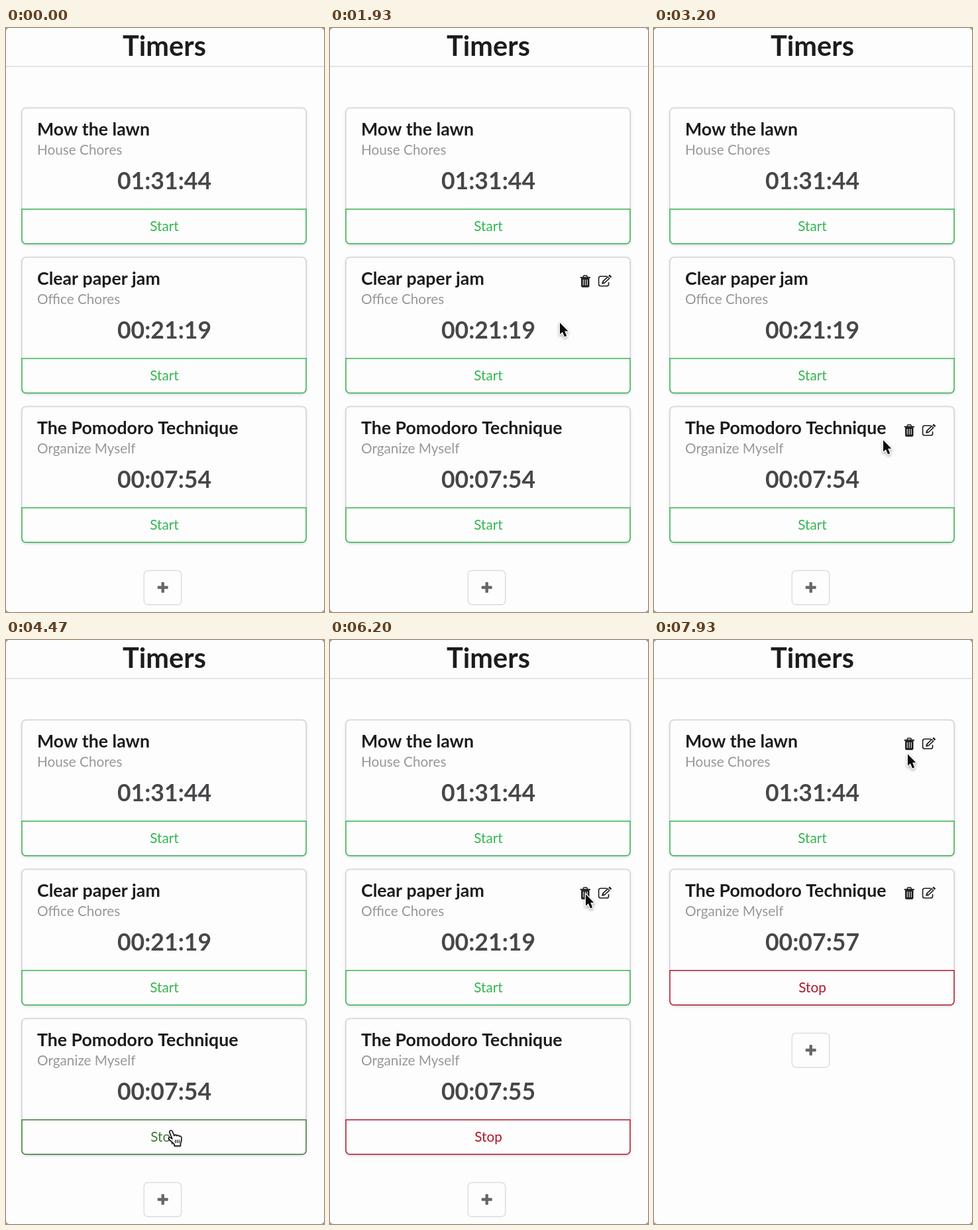
Animation, 480 px wide and 880 px high, one loop 8 s. Source, as an HTML page with a canvas:

```html
<!DOCTYPE html>
<html lang="en">
<head>
<meta charset="utf-8">
<title>Timers</title>
<style>
  html, body { margin: 0; width: 100%; height: 100%; overflow: hidden; background: #fefdfe; }
  canvas { display: block; width: 480px; height: 880px; }
</style>
</head>
<body>
<canvas id="stage"></canvas>
<script>
const W = 480, H = 880, LOOP = 8000;
const CLICK = 4440, REMOVED = 7300, TICK = 5400;
const LEFT = 24, WIDTH = 429, FIRST = 120.5, PITCH = 225, CONTENT = 152.5, HEIGHT = 204.5;
const GREEN = [53, 181, 80], GREEN_HOVER = [32, 152, 62], RED = [172, 24, 42];

const canvas = document.getElementById('stage');
const dpr = window.devicePixelRatio || 1;
canvas.width = W * dpr;
canvas.height = H * dpr;
const ctx = canvas.getContext('2d');

// Pointer stops: time, x, y
const path = [
  [300, 350, 172], [450, 350, 215], [900, 349, 640], [1200, 349, 798],
  [1400, 349, 798], [1900, 347, 444], [1980, 347, 444], [2300, 345, 43],
  [2420, 345, 43], [2620, 345, 180], [3150, 346, 621], [3400, 346, 621],
  [3950, 249, 740], [5150, 249, 740], [5570, 378, 672], [5640, 378, 672],
  [6040, 386, 383], [7460, 386, 383], [7860, 383, 172], [8000, 383, 172]
];

const rgb = c => `rgb(${c.map(Math.round).join(',')})`;
const mix = (a, b, p) => a.map((v, i) => v + (b[i] - v) * p);
const clamp = v => Math.max(0, Math.min(1, v));
const ease = p => p * p * (3 - 2 * p);

function pointerAt(t) {
  if (t < path[0][0]) return null;
  const i = path.findIndex(k => k[0] > t);
  const [t0, x0, y0] = path[i - 1], [t1, x1, y1] = path[i];
  const p = ease((t - t0) / (t1 - t0));
  return { x: x0 + (x1 - x0) * p, y: y0 + (y1 - y0) * p };
}

function text(str, x, y, size, color, weight = 400, align = 'left') {
  ctx.font = `${weight} ${size}px Lato, sans-serif`;
  ctx.textAlign = align;
  ctx.fillStyle = color;
  ctx.fillText(str, x, y);
}

function box(x, y, w, h, radii, stroke, fill) {
  ctx.beginPath();
  ctx.roundRect(x, y, w, h, radii);
  if (fill) { ctx.fillStyle = fill; ctx.fill(); }
  if (stroke) { ctx.strokeStyle = stroke; ctx.lineWidth = 1.5; ctx.stroke(); }
}

function shadow(color, blur, dy) {
  ctx.shadowColor = color;
  ctx.shadowBlur = blur * dpr;
  ctx.shadowOffsetY = dy * dpr;
}

function line(points, width, color) {
  ctx.beginPath();
  points.forEach(([x, y]) => ctx.lineTo(x, y));
  ctx.lineWidth = width;
  ctx.strokeStyle = color;
  ctx.stroke();
}

function at(x, y, draw) {
  ctx.save();
  ctx.translate(x, y);
  draw();
  ctx.restore();
}

function trash() {
  const ink = '#1c1c1e';
  line([[-3.3, -6.3], [-2.2, -8.5], [2.2, -8.5], [3.3, -6.3]], 1.5, ink);
  box(-7.8, -6.6, 15.6, 1.9, 0.6, null, ink);
  box(-6.2, -5, 12.4, 14.2, [0, 0, 2, 2], null, ink);
  for (const x of [-3, 0, 3]) line([[x, -2.6], [x, 6.2]], 1.2, '#e6e6e8');
}

function edit() {
  const ink = '#1c1c1e';
  ctx.beginPath();
  ctx.moveTo(3.2, -6.8);
  ctx.lineTo(-6.3, -6.8);
  ctx.arcTo(-9.2, -6.8, -9.2, -4, 2.9);
  ctx.lineTo(-9.2, 4.8);
  ctx.arcTo(-9.2, 7.8, -6.3, 7.8, 2.9);
  ctx.lineTo(2.8, 7.8);
  ctx.arcTo(5.8, 7.8, 5.8, 4.8, 2.9);
  ctx.lineTo(5.8, 2);
  ctx.lineWidth = 1.6;
  ctx.strokeStyle = ink;
  ctx.stroke();
  line([[-2, 2.3], [6.2, -5.4]], 5, ink);
  line([[-1.4, 1.8], [5.4, -4.6]], 1.8, '#fefdfe');
  line([[7.1, -6.2], [8.9, -7.9]], 4.6, ink);
  ctx.beginPath();
  ctx.moveTo(-4.6, 4.8);
  ctx.lineTo(-3.9, 0.4);
  ctx.lineTo(-0.2, 4.2);
  ctx.fillStyle = ink;
  ctx.fill();
}

function arrow() {
  const shape = new Path2D('M0 0V17.6L4 13.9L7 21.2L10.2 19.9L7.2 12.8H12.4Z');
  ctx.lineJoin = 'round';
  shadow('rgba(0,0,0,.35)', 4, 2);
  ctx.lineWidth = 2.6;
  ctx.strokeStyle = '#fff';
  ctx.stroke(shape);
  shadow('transparent', 0, 0);
  ctx.fillStyle = '#0c0c0e';
  ctx.fill(shape);
}

function hand() {
  const shape = new Path2D(
    'M-2.2 1.6C-2.4-1.2 1-2 2.2.6L5 7.2C5.4 5.2 8 5 8.8 7.2' +
    'C9.6 5.6 12 6 12.4 8C13.4 6.8 15.6 7.6 15.8 10C16.2 14 15.6 16 14.4 18.4V22.4H5.2V20' +
    'C2.6 17.6-.2 14.6-3 12.4C-4.6 10.8-2.6 8.6-.4 10L2 12Z');
  ctx.lineJoin = 'round';
  shadow('rgba(0,0,0,.3)', 3, 1.5);
  ctx.fillStyle = '#fff';
  ctx.fill(shape);
  shadow('transparent', 0, 0);
  ctx.lineWidth = 1.6;
  ctx.strokeStyle = '#111';
  ctx.stroke(shape);
  for (const x of [6.6, 9.4, 12.2]) line([[x, 13], [x, 18]], 1.2, '#111');
}

function inside(p, top, bottom) {
  return p && p.x > LEFT && p.x < LEFT + WIDTH && p.y > top && p.y < bottom;
}

function card(timer, top, pointer) {
  const overButton = inside(pointer, top + CONTENT, top + HEIGHT);
  const base = overButton ? GREEN_HOVER : GREEN;
  const color = rgb(mix(base, RED, timer.running));
  const split = top + CONTENT;

  shadow('rgba(190,190,198,.8)', 4, 1.6);
  box(LEFT, top, WIDTH, HEIGHT, 6, null, '#fefdfe');
  shadow('transparent', 0, 0);
  box(LEFT, top, WIDTH, HEIGHT, 6, '#d4d3d8');
  box(LEFT, split, WIDTH, HEIGHT - CONTENT, [0, 0, 6, 6], color, '#fefdfe');

  text(timer.title, 47, top + 41, 26.7, '#1c1c1e', 700);
  text(timer.project, 47, top + 70.5, 20.76, '#979799');
  text(timer.time, 239, top + 122.5, 35.6, '#474749', 700, 'center');
  text(timer.running > 0 ? 'Stop' : 'Start', 239, top + 185.5, 20.76, color, 400, 'center');

  if (timer.pinned || inside(pointer, top, split)) {
    at(385.3, top + 36, trash);
    at(414.8, top + 35.5, edit);
  }
  return overButton;
}

function addButton(y) {
  box(208.3, y, 56.4, 51.5, 6, '#dddce0', '#fefdfe');
  ctx.fillStyle = '#676769';
  ctx.beginPath();
  ctx.roundRect(228.7, y + 23.3, 16, 4.4, 1);
  ctx.roundRect(234.5, y + 17.5, 4.4, 16, 1);
  ctx.fill();
}

function draw(t) {
  ctx.setTransform(dpr, 0, 0, dpr, 0, 0);
  ctx.fillStyle = '#96959b';
  ctx.fillRect(0, 0, W, H);
  box(0, 0, W, H, 5, null, '#fefdfe');

  text('Timers', 239, 42, 41.5, '#1c1c1e', 700, 'center');
  ctx.fillStyle = '#dddce1';
  ctx.fillRect(0, 57.2, W, 1.5);

  const seconds = 54 + (t < TICK ? 0 : 1 + Math.floor((t - TICK) / 1000));
  const removed = t >= REMOVED;
  const timers = [
    { title: 'Mow the lawn', project: 'House Chores', time: '01:31:44', running: 0 },
    { title: 'Clear paper jam', project: 'Office Chores', time: '00:21:19', running: 0 },
    { title: 'The Pomodoro Technique', project: 'Organize Myself', time: '00:07:' + seconds,
      running: clamp((t - CLICK) / 130), pinned: removed }
  ];
  if (removed) timers.splice(1, 1);

  const pointer = pointerAt(t);
  let overButton = false;
  timers.forEach((timer, i) => {
    if (card(timer, FIRST + i * PITCH, pointer)) overButton = true;
  });
  addButton(142.5 + timers.length * PITCH);

  if (pointer) at(pointer.x, pointer.y, overButton ? hand : arrow);
}

const start = performance.now();
function frame() {
  draw((performance.now() - start) % LOOP);
  requestAnimationFrame(frame);
}
frame();
</script>
</body>
</html>
```
